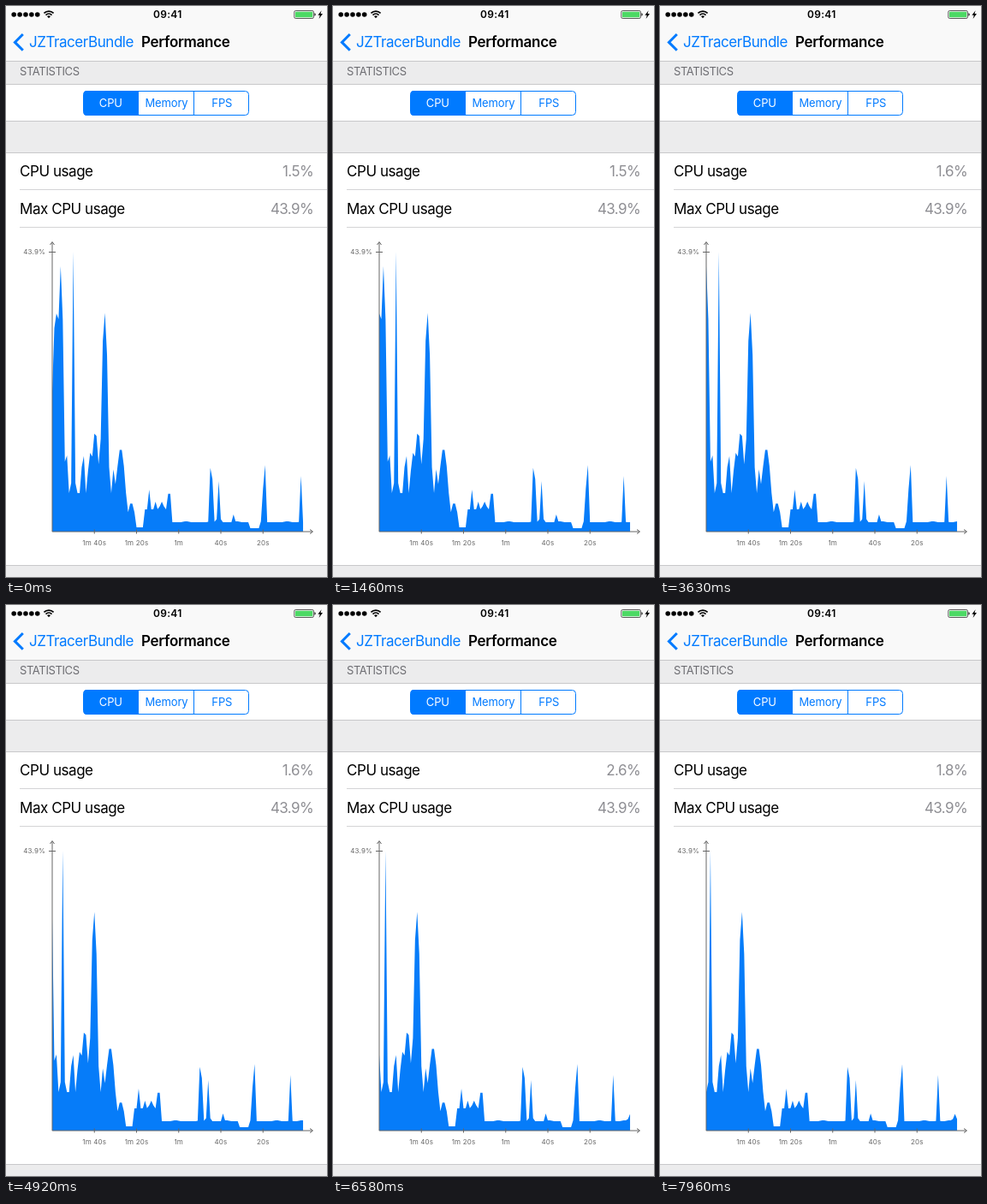
An HTML page that plays this animation: 375 by 667 pixels, repeating every 8 s.

```html
<!DOCTYPE html>
<html lang="en">
<head>
<meta charset="utf-8">
<title>Performance</title>
<style>
  html, body { margin: 0; width: 100%; height: 100%; overflow: hidden; background: #fff; }
  svg { display: block; width: 100vw; height: 100vh; }
  text { font: 17px Inter, "Open Sans", sans-serif; letter-spacing: -.45px; }
  .status { font-size: 12px; font-weight: 600; letter-spacing: .25px; }
  .title { font-weight: 600; letter-spacing: -.3px; }
  .header { font-size: 13px; letter-spacing: -.36px; fill: #6d6d72; }
  .segment { font-size: 13px; letter-spacing: -.15px; fill: #007aff; text-anchor: middle; }
  .value { fill: #8e8e93; text-anchor: end; letter-spacing: -.6px; }
  .label { font-size: 8px; letter-spacing: .15px; fill: #666; }
  .blue { fill: #007aff; }
  .group { fill: #ececed; }
  .rule { stroke: #c8c8ca; fill: none; }
  .axis { stroke: #666; fill: none; }
</style>
</head>
<body>
<svg viewBox="0 0 375 667">
  <rect width="375" height="667" fill="#fff"/>
  <rect width="375" height="64" fill="#f9f9f9"/>
  <path class="group" d="M0 65H375V91H0ZM0 135H375V171H0ZM0 654H375V667H0Z"/>
  <path class="rule" d="M0 64.5H375M0 91.5H375M0 134.5H375M0 171.5H375M0 653.5H375"/>
  <path class="rule" d="M16 214.5H375M16 258.5H375" style="stroke:#d4d4d6"/>

  <!-- Status bar -->
  <path d="M9.2 10h27.6" stroke="#000" stroke-width="5.6" stroke-linecap="round" stroke-dasharray="0 6.88"/>
  <path d="M44.4 8.4a8 8 0 0 1 11.2 0M46.5 10.6a5 5 0 0 1 7 0" fill="none" stroke="#000" stroke-width="1.7"/>
  <path d="M50 14.2l-2-2.1a2.9 2.9 0 0 1 4 0z"/>
  <text class="status" x="188.8" y="14.3" text-anchor="middle">09:41</text>
  <rect x="336.8" y="5.5" width="22.6" height="9" rx="1.6" fill="none" stroke="#333" stroke-width=".8"/>
  <rect x="338" y="6.7" width="20.2" height="6.6" rx=".6" fill="#4cd964"/>
  <path d="M360.3 8.3q1.6.3 1.6 1.7t-1.6 1.7z" fill="#333"/>
  <path d="M368.6 5.2l-4.2 5.5h2.4l-1.2 4.2 4.4-5.8h-2.5z"/>

  <!-- Navigation bar -->
  <path d="M19.8 33L10.4 42.4L19.8 51.8" fill="none" stroke="#007aff" stroke-width="3"/>
  <text class="blue" x="27" y="48">JZTracerBundle</text>
  <text class="title" x="158" y="48">Performance</text>

  <!-- Table -->
  <text class="header" x="16" y="81">STATISTICS</text>
  <path class="blue" d="M154.5 99H94.5a4 4 0 0 0-4 4v21a4 4 0 0 0 4 4h60z"/>
  <rect x="90.5" y="99.5" width="193" height="28" rx="4" fill="none" stroke="#007aff"/>
  <path d="M154.5 99v29M219.5 99v29" stroke="#007aff"/>
  <text class="segment" x="122.3" y="118" style="fill:#fff">CPU</text>
  <text class="segment" x="187.5" y="118">Memory</text>
  <text class="segment" x="252.3" y="118">FPS</text>
  <text x="16" y="199">CPU usage</text>
  <text class="value" id="usage" x="359" y="199"></text>
  <text x="16" y="243">Max CPU usage</text>
  <text class="value" x="359" y="243">43.9%</text>

  <!-- Chart -->
  <path id="area" fill="#067cf9"/>
  <path class="axis" d="M54 614V276M51.5 279L54 275.5L56.5 279M50 287.5H58M54 614H358M355 611.5L358.5 614L355 616.5"/>
  <path class="axis" id="ticks"/>
  <text class="label" x="46" y="290.3" text-anchor="end">43.9%</text>
  <g id="labels"></g>
</svg>
<script>
const LOOP = 8000, FIRST_SAMPLE = 210;
const LEFT = 54, BASE = 614, SECOND = 2.4625, POINTS = 120;
const MAX_USAGE = 43.9, MAX_HEIGHT = 327;

// Bursts of load: second, height in pixels, half width in seconds.
const bursts = [
  [1.8, 256, 3], [4, 310, 2.24], [6.6, 95, 1.6], [10, MAX_HEIGHT, 1.1],
  [14.7, 91, 1.7], [18, 92, 2.1], [20.4, 117, 2.8], [24.9, 256, 2.5],
  [29.2, 74, 1.6], [32.5, 98, 3.2], [37.5, 34, 2.6], [46, 49, 1.4],
  [49, 35, 2], [52, 35, 2.5], [55.5, 49, 1.6], [75.35, 80, 1.35],
  [79, 59, 1.15], [86, 20, 1.2], [100.7, 84, 1.1], [118, 65, 1.1], [126, 19.4, 1.8]
];

// Load between bursts: busy at first, then idle with a slight ripple.
function idleHeight(second) {
  if (second < 36) return 45;
  if (second < 44) return 5;
  if (second < 57) return 26;
  if (second > 93 && second < 99) return 4;
  return 11 + 1.2 * Math.cos((second - 111.5) * Math.PI / 12) ** 12;
}

function heightAt(second) {
  const peaks = bursts.map(([at, height, width]) => height * (1 - ((second - at) / width) ** 2));
  return Math.max(idleHeight(second), ...peaks);
}

const find = id => document.getElementById(id);
const area = find("area"), usage = find("usage");

const tickX = i => LEFT + 20 * SECOND * (i + 1);
const tickNames = ["1m 40s", "1m 20s", "1m", "40s", "20s"];
find("ticks").setAttribute("d", tickNames.map((_, i) => `M${tickX(i)} 611.5v5`).join(""));
find("labels").innerHTML = tickNames.map((name, i) =>
  `<text class="label" x="${tickX(i)}" y="630" text-anchor="middle">${name}</text>`).join("");

let shown = -1;
function draw(now) {
  requestAnimationFrame(draw);
  const start = Math.floor((now % LOOP - FIRST_SAMPLE) / 1000) + 1;
  if (start === shown) return;
  shown = start;
  const heights = Array.from({ length: POINTS }, (_, i) => heightAt(start + i));
  const outline = heights.map((height, i) => `L${LEFT + i * SECOND} ${BASE - height}`).join("");
  area.setAttribute("d", `M${LEFT} ${BASE}${outline}V${BASE}Z`);
  usage.textContent = (heights[POINTS - 1] / MAX_HEIGHT * MAX_USAGE).toFixed(1) + "%";
}
draw(performance.now());
</script>
</body>
</html>
```
